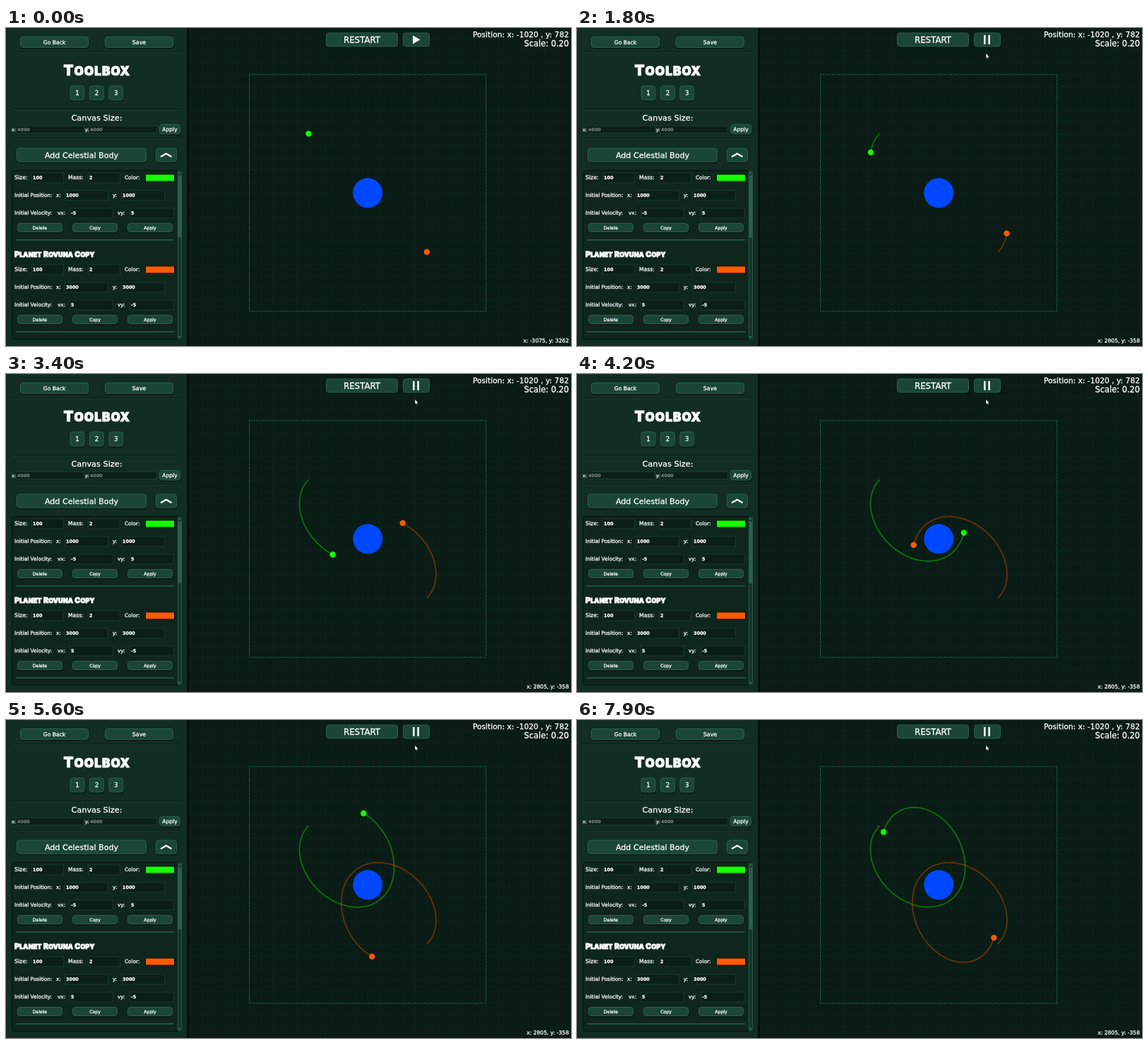
An HTML page for the animation above (8 s loop, 800 px wide and 450 px high).

```html
<!DOCTYPE html>
<html lang="en">
<head>
<meta charset="utf-8">
<title>Orbit sandbox</title>
<style>
  html, body { margin: 0; width: 100%; height: 100%; overflow: hidden; background: #0a1c15; }
  svg { display: block; width: 800px; height: 450px; }
  text { font-family: "DejaVu Sans", sans-serif; fill: #fff; stroke: #fff; stroke-width: .28; }
  .strong { font-weight: 700; }
  .heavy { font-family: Inter, "Open Sans", sans-serif; font-weight: 900; stroke-width: 1; }
  .dim { fill: #87938c; stroke: none; }
</style>
</head>
<body>
<svg id="stage" viewBox="0 0 800 450">
  <defs>
    <pattern id="grid" x="344.5" y="65.8" width="16.75" height="16.75" patternUnits="userSpaceOnUse">
      <path d="M0 0H16.75M0 0V16.75" stroke="#0d231a" stroke-width="1.4" fill="none"/>
    </pattern>
    <clipPath id="panel"><rect x="8" y="201" width="241" height="240" rx="4"/></clipPath>
  </defs>
</svg>
<script>
const LOOP = 8000, FRAME = 100;
const SUN = { x: 512.2, y: 233.3 }, UNIT = 0.08375, ORIGIN = { x: 344.5, y: 65.8 };
const stage = document.getElementById('stage');

function add(tag, attrs, parent = stage) {
  const el = document.createElementNS('http://www.w3.org/2000/svg', tag);
  for (const key in attrs) el.setAttribute(key, attrs[key]);
  parent.append(el);
  return el;
}
const rect = (x, y, width, height, fill, more, parent) =>
  add('rect', { x, y, width, height, fill, ...more }, parent);
const line = (d, stroke, width, more, parent) =>
  add('path', { d, stroke, 'stroke-width': width, fill: 'none', ...more }, parent);
function label(str, x, y, size, more, parent) {
  const el = add('text', { x, y, 'font-size': size, ...more }, parent);
  el.textContent = str;
  return el;
}
function button(x, y, w, h, str, size, parent) {
  rect(x + .5, y + 1.8, w, h, '#06130e', { rx: 4, opacity: .6 }, parent);
  rect(x + .5, y + .5, w - 1, h - 1, '#1b4637', { rx: 3.5, stroke: '#28614c' }, parent);
  if (str) label(str, x + w / 2, y + h / 2 + size * .36, size, { 'text-anchor': 'middle' }, parent);
}
function field(x, y, w, h, str, cls, parent) {
  rect(x + .5, y + .5, w - 1, h - 1, '#0b1f17', { stroke: '#18392d' }, parent);
  label(str, x + 2, y + h / 2 + 2.3, 6.4, { class: cls }, parent);
}
function divider(y) {
  rect(8, y, 241, 1, '#091a13');
  rect(8, y + 1, 241, 1, '#1a3d30');
}
// Heading in capitals with larger initials
function heading(str, x, y, big, small, more, parent) {
  const el = add('text', { x, y, class: 'heavy', ...more }, parent);
  for (const [i, word] of str.split(' ').entries()) {
    add('tspan', { 'font-size': big }, el).textContent = (i ? ' ' : '') + word[0];
    add('tspan', { 'font-size': small }, el).textContent = word.slice(1).toUpperCase();
  }
}

function bodyForm(y, color, pos, vel, parent) {
  const text = (str, x, row, size = 7.3) => label(str, x, y + row + 2.6, size, {}, parent);
  text('Size:', 12, 11, 7.8);
  field(36, y + 4, 46, 15, '100', 'strong', parent);
  text('Mass:', 88, 11, 7.6);
  field(116, y + 4, 46, 15, '2', 'strong', parent);
  text('Color:', 168, 11);
  rect(197, y + 6, 42.5, 11, '#06120d', {}, parent);
  rect(198, y + 7, 40, 9, color, {}, parent);
  text('Initial Position:', 12, 36);
  text('x:', 71, 36);
  field(83, y + 29, 62, 15, pos, 'strong', parent);
  text('y:', 151, 36);
  field(163, y + 29, 62, 15, pos, 'strong', parent);
  text('Initial Velocity:', 12, 61);
  text('vx:', 73, 61);
  field(90, y + 54, 62, 15, vel[0], 'strong', parent);
  text('vy:', 158, 61);
  field(175, y + 54, 63, 15, vel[1], 'strong', parent);
  ['Delete', 'Copy', 'Apply'].forEach((str, i) => button(16 + 78 * i, y + 75.5, 64, 13, str, 6.2, parent));
  rect(14, y + 98.7, 224, 1.5, '#23644d', {}, parent);
}

// Canvas
rect(0, 0, 800, 450, '#0a1c15');
rect(258, 0, 542, 450, 'url(#grid)');
rect(344.5, 65.8, 335, 335, 'none', { stroke: '#2c7255', 'stroke-width': 1, 'stroke-dasharray': '1.7 1.6' });

const makeBody = (color, sign) => ({
  sign,
  trail: line('', color, 1.9, { opacity: .35, 'stroke-linejoin': 'round' }),
  color
});
const planets = [makeBody('#14ff00', 1), makeBody('#ff5a00', -1)];
add('circle', { cx: SUN.x, cy: SUN.y, r: 21, fill: '#0048ff' });
for (const p of planets) p.dot = add('circle', { r: 4.2, fill: p.color });

button(453, 6.5, 102, 20, 'RESTART', 11.8);
button(562, 6.5, 38, 20);
const playIcon = add('path', { d: 'M576 10.5L586.5 16.5L576 22.5Z', fill: '#fff' });
const pauseIcon = add('path', { d: 'M576 10h2.6v13h-2.6zM582.3 10h2.6v13h-2.6z', fill: '#fff' });
const right = { 'text-anchor': 'end' };
label('Position: x: -1020 , y: 782', 797, 13.3, 10.7, right);
label('Scale: 0.20', 797, 25.8, 11.4, right);
const readout = label('', 797, 445.3, 7.6, right);

// Sidebar
rect(0, 0, 257, 450, '#122d23');
rect(256.5, 0, 2.5, 450, '#040b08');
button(20, 12, 97, 16, 'Go Back', 7.6);
button(140, 12, 97, 16, 'Save', 7.9);
divider(33.5);
heading('Toolbox', 128.8, 67.2, 20.4, 17.2, { 'text-anchor': 'middle', 'letter-spacing': 1 });
['1', '2', '3'].forEach((str, i) => button(90.5 + 27.4 * i, 81.5, 21, 21, str, 8.6));
divider(114.5);
label('Canvas Size:', 128.5, 130.8, 11.3, { 'text-anchor': 'middle' });
label('x:', 8, 145.8, 6);
field(14, 138, 97, 11, '4000', 'strong dim');
label('y:', 112, 145.8, 6);
field(117, 138, 97, 11, '4000', 'strong dim');
button(217, 136, 30, 14.5, 'Apply', 7.6);
divider(155.5);
button(15, 169.7, 184, 20, 'Add Celestial Body', 11.1);
button(212, 169.7, 30, 20);
line('M219 182.3L226.8 177.8L234.5 182.3', '#fff', 2.2);

rect(8.5, 201.5, 240, 239, '#0f261d', { rx: 4, stroke: '#06120d' });
const list = add('g', { 'clip-path': 'url(#panel)' });
bodyForm(200.5, '#14ff00', '1000', ['-5', '5'], list);
heading('Planet Rovuna Copy', 12, 324.2, 10.6, 8.9, { 'letter-spacing': .2, 'stroke-width': .5 }, list);
bodyForm(330.5, '#ff5a00', '3000', ['5', '-5'], list);
rect(243.3, 202.3, 5.2, 237.5, '#14352a', { stroke: '#28614c', 'stroke-width': .8 }, list);
rect(243.3, 208.5, 5.2, 88, '#2a5f4a', {}, list);
add('path', { d: 'M244 206L245.8 203.5L247.6 206ZM244 436L245.8 438.5L247.6 436Z', fill: '#3b8065' }, list);

// Pointers, with the tip at 0,0
const arrow = add('path', {
  d: 'M0 0V7.2L1.7 5.7L2.8 8L4 7.4L2.9 5.2H5Z', fill: '#fff', stroke: '#111', 'stroke-width': .5
});
const hand = add('path', {
  d: 'M0 .4Q.8-.5 1.5.5V3.2L4.6 4Q5.5 4.3 5.3 5.5L4.6 9H.2L-2.3 5.6Q-2 4.3-.2 5.4Z',
  fill: '#fff', stroke: '#111', 'stroke-width': .5
});

// Precessing ellipse: 1/r = A - B cos(K * swept angle), starting at the far point
const A = .022646, B = .0142, K = 1.05, ECC = B / A;
const START = 1000, RATE = .001067, SQUASH = Math.sqrt((1 + ECC) / (1 - ECC));

function phaseAt(t) {
  const mean = Math.max(0, t - START) * RATE;
  let lo = 0, hi = 10;
  for (let i = 0; i < 40; i++) {
    const mid = (lo + hi) / 2;
    if (mid + ECC * Math.sin(mid) < mean) lo = mid; else hi = mid;
  }
  const turns = Math.round(lo / (2 * Math.PI));
  return 2 * Math.atan(Math.tan(lo / 2) / SQUASH) + 2 * Math.PI * turns;
}
function pointAt(phase, sign) {
  const r = sign / (A - B * Math.cos(phase)), angle = Math.PI * .75 + phase / K;
  return [SUN.x + r * Math.cos(angle), SUN.y - r * Math.sin(angle)];
}

// time, x, y of the pointer tip
const pointerPath = [
  [0, 87, 339], [100, 100, 330], [300, 280, 205], [500, 500, 65], [600, 565.6, 27.5],
  [700, 569.5, 22], [1100, 569.5, 22], [1300, 579, 35.8], [LOOP, 579, 35.8]
];
function pointerAt(t) {
  const i = pointerPath.findIndex(p => p[0] > t);
  const [t0, x0, y0] = pointerPath[i - 1], [t1, x1, y1] = pointerPath[i];
  const f = (t - t0) / (t1 - t0);
  return [x0 + (x1 - x0) * f, y0 + (y1 - y0) * f];
}
const show = (el, on) => el.setAttribute('visibility', on ? 'visible' : 'hidden');

function coordinates(t) {
  if (t < 100) return 'x: -3075, y: 3262';
  if (t >= 600 && t < 1200) return 'x: 2640, y: -458';
  if (t >= 1300) return 'x: 2805, y: -358';
  const [x, y] = pointerAt(t);
  return `x: ${Math.round((x - ORIGIN.x) / UNIT)}, y: ${Math.round((y - ORIGIN.y) / UNIT)}`;
}

function draw(t) {
  const phase = phaseAt(t);
  for (const { sign, trail, dot } of planets) {
    const pts = [];
    for (let a = 0; a < phase; a += .04) pts.push(pointAt(a, sign));
    const [x, y] = pointAt(phase, sign);
    pts.push([x, y]);
    trail.setAttribute('d', 'M' + pts.map(p => p.map(n => n.toFixed(2)).join(' ')).join('L'));
    dot.setAttribute('cx', x);
    dot.setAttribute('cy', y);
  }
  show(playIcon, t < START);
  show(pauseIcon, t >= START);

  const [px, py] = pointerAt(t), overButton = px > 562 && px < 600 && py < 27;
  for (const el of [arrow, hand]) el.setAttribute('transform', `translate(${px} ${py})`);
  show(arrow, t >= 100 && !overButton);
  show(hand, overButton);
  readout.textContent = coordinates(t);
}

function tick() {
  draw(Math.floor(performance.now() % LOOP / FRAME) * FRAME);
  requestAnimationFrame(tick);
}
tick();
</script>
</body>
</html>
```
